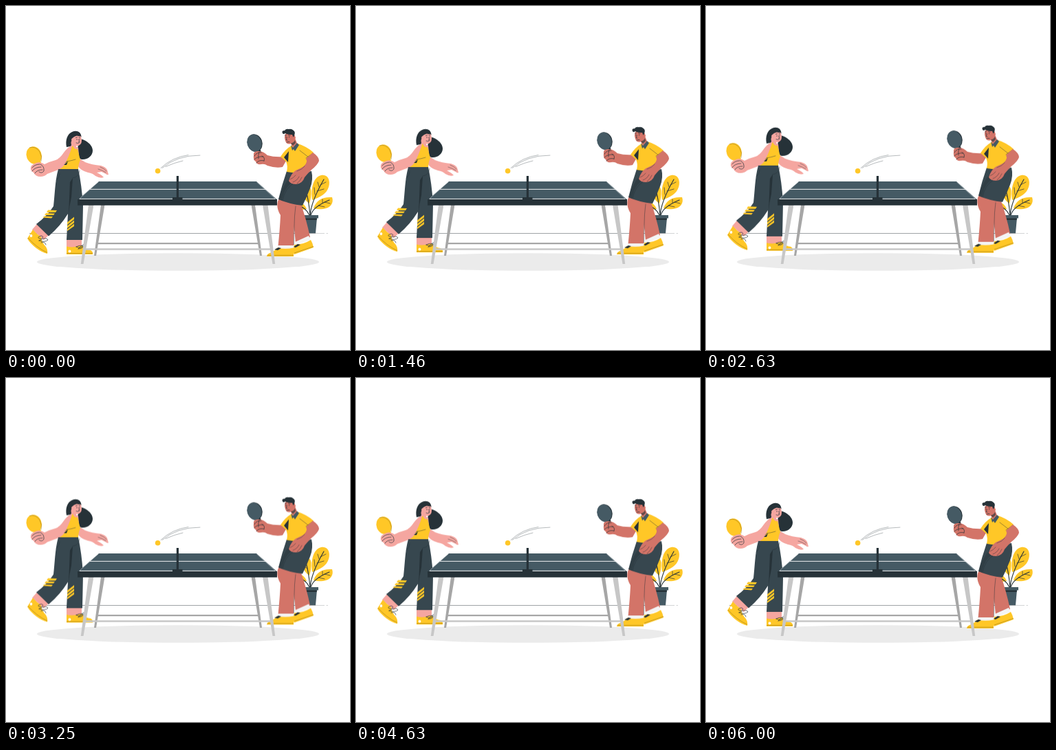
These frames come from a looping animation (500x500 px, 6.04 s). An HTML page:

```html
<!DOCTYPE html>
<html lang="en">
<head>
<meta charset="utf-8">
<title>Table tennis</title>
<style>
  html, body { margin: 0; width: 100%; height: 100%; overflow: hidden; background: #fff; }
  svg { display: block; width: 100vw; height: 100vh; }
  .dark { fill: #263238; }
  .cloth { fill: #37474f; }
  .slate { fill: #455a64; }
  .gold { fill: #ffc727; }
  .pink { fill: #f5a6a0; }
  .tan { fill: #d37468; }
  .near { fill: #c7c7c7; }
  .far { fill: #a6a6a6; }
  .white { fill: #fff; }
  .ink { fill: none; stroke: #263238; stroke-width: .7; stroke-linecap: round; stroke-linejoin: round; }
  .fine { stroke-width: .45; }
  .bold { stroke-width: 1.1; }
  .sole { fill: none; stroke: #8a6a10; stroke-width: .5; }
  .edge { fill: none; stroke: #fff; stroke-width: .9; }
  .floor { fill: none; stroke: #263238; stroke-width: .6; }
</style>
</head>
<body>
<svg viewBox="0 0 500 500">
  <ellipse cx="250" cy="372" rx="205" ry="12.800" fill="#ebebeb"/>
  <path class="floor" d="M34 330.500H450" opacity=".75"/>
  <path class="floor" d="M450 330.500H463M465.500 330.500H468" opacity=".35"/>

  <g id="plant">
    <path class="gold" d="M445 282C443 266 446 249 458 246C468 244 472 254 469 263C466 273 457 278 445 282Z"/>
    <path class="gold" d="M447 294C451 282 460 277 474 278C477 287 471 294 461 295Q453 296 447 294Z"/>
    <path class="gold" d="M441 287C431 281 428 268 436 262Q442 260 443.500 268Q444 278 441 287Z"/>
    <path class="gold" d="M437 295C427 298 421 294 421 287C427 283 434 287 437 295Z"/>
    <path class="ink bold" d="M442 305Q443 285 462 252M443 304Q446 292 470 282M442 304Q440 283 436 268M441 304Q436 293 424 290"/>
    <path class="ink" d="M449 274L448 264M452 269L462 266M455 263L453 256M457 260L465 256M454 290L463 292M460 286L460 281M463 285L471 287M438 277L434 274M430 291L428 295"/>
    <path class="slate" d="M433 308H452L450 330H436Z"/>
    <path class="dark" d="M433 308H452L451.600 311H433.600Z"/>
    <path class="slate" d="M431 304H454V308.500H431Z"/>
  </g>

  <g id="players">
    <g id="girl">
      <!-- far arm -->
      <path class="pink" d="M104 220L115 227Q125 231 138 232Q145 234 147 238L149 245Q147 246 145 244L139 241L132 242Q140 246 142 249Q137 251 130 247Q126 243 119 242Q108 239 104 232Z"/>
      <path class="ink fine" d="M137 234Q143 236 146 240M134 237Q141 239 145 242"/>
      <!-- hair and head -->
      <path class="dark" d="M107 193C116 194 126 202 126 210C126 218 118 224 110 223C104 222 106 214 104 207Z"/>
      <path class="dark" d="M88 205C86 195 89 186 96 183C102 180 109 182 109.500 190L104 200L94 204Z"/>
      <path class="pink" d="M94 196Q97 188 108 188Q111 194 109.500 199Q107 204 102 203L103 212L92 210L95 202Z"/>
      <path class="dark" d="M92 199Q92 187 101 183Q108 183 109 189Q104 190 102 187Q98 191 95 192Q96 196 94 199Z"/>
      <path class="ink" d="M103 193.500v1M107 193v1M105.500 194L107 197L105.500 197.500M102 199Q105 200.500 107 198.500M101.500 191.500l2-.7M106 190.800l1.500.2"/>
      <!-- trunk -->
      <path class="pink" d="M96 202L105 206L106 216L90 216Z"/>
      <path class="gold" d="M97 203Q99 209 104 208Q106 216 108 224Q105 230 105 238H77L85 224L93 207Z"/>
      <!-- racket -->
      <ellipse class="gold" cx="40.700" cy="217" rx="11" ry="13" transform="rotate(-22 40.700 217)"/>
      <path class="sole" d="M34 206Q43 203 49 212Q53 219 51 226"/>
      <path class="gold" d="M42 228L50 225L57 243L53 245Z"/>
      <!-- near arm -->
      <path class="pink" d="M95 203Q89 206 84 213Q78 222 72 224Q64 226 56 230Q50 226 44 228Q36 231 36 235Q35 239 40 242Q43 248 50 248Q56 248 60 244L76 238Q84 235 88 225Q94 212 96 204Z"/>
      <path class="ink" d="M38 235Q42 230 49 230M38 240Q42 234 51 234M42 243Q45 238 53 238M50 230Q56 233 55 240Q52 244 48 241"/>
      <path class="ink fine" d="M88 226Q95 225 101 223M86 228L89 226"/>
      <path class="dark" d="M84 231L90 226L88 231Z"/>
      <!-- legs -->
      <path class="pink" d="M45 317L62 333L55 340L38 325ZM88 338H110V351H88Z"/>
      <path class="cloth" d="M76 237H105Q110 260 112 290L111 340H88L90 302Q79 320 62 334.500L44 317Q61 304 69 291C71 275 71 255 76 237Z"/>
      <path class="dark" d="M97 250L93 256L91 304Q92 290 95 278Z"/>
      <path class="ink fine" d="M97 250Q106 249 107 239M78 243Q78 249 73 253"/>
      <path class="gold" d="M61 296.500L74 297L72 300H59ZM58 301L71 301.500L69 304H56ZM55 305.500L68 306L66 308.500L54 307.500Z"/>
      <path class="gold" d="M89 314.500L99 306.500V310L89 318ZM89 319.500L99 311.500V315L89 323ZM89 324.500L99 316.500V320L89 327Z"/>
      <!-- shoes -->
      <path class="gold" d="M39 325Q45 332 51 336Q52 344 58 350Q61 355 60 360Q52 358 44 352Q35 345 31 338Z"/>
      <path class="sole" d="M32 337Q44 351 60 358.500"/>
      <path class="ink" d="M47 336Q52 332 54 336Q51 340 47 337M48 341Q59 335 61 340Q57 344 48 341M51 344Q57 342 58 347"/>
      <circle class="white" cx="36.500" cy="334" r="1.900"/>
      <path class="gold" d="M88 349.500Q98 352 110 348Q115 354 123 355Q127 357 126 361H88Z"/>
      <path class="sole" d="M88 359.500H126"/>
      <path class="ink" d="M102 350Q108 347 112 349Q108 353 102 350M105 353Q113 345 114 347Q112 353 105 353"/>
      <circle class="white" cx="92.500" cy="356.500" r="1.900"/>
    </g>

    <g id="boy">
      <!-- racket -->
      <path class="dark" d="M364 209L369 207L376 226L372 227Z"/>
      <ellipse class="dark" cx="361.800" cy="199" rx="10.700" ry="13" transform="rotate(-20 361.800 199)"/>
      <ellipse class="slate" cx="361" cy="199.200" rx="10.500" ry="12.800" transform="rotate(-20 361 199.200)"/>
      <!-- far arm -->
      <path class="tan" d="M404 219Q390 220 380 217Q373 210 366 211Q359 211 360 217Q359 224 363 226Q364 231 371 230Q376 229 380 232Q392 236 402 234L410 220Z"/>
      <path class="ink" d="M361 218Q365 212 371 213M361 223Q366 218 374 219M364 228Q368 223 375 225M368 212Q366 217 367 222M372 218Q377 220 375 225"/>
      <!-- legs -->
      <path class="tan" d="M414 286L429 289Q436 308 442 336L421 345Q419 316 412 292Z"/>
      <path class="tan" d="M397 280L422 286Q422 298 419 312L418 349H395.500Q398 325 399 304C396 299 393 292 395 284Z"/>
      <path class="ink fine" d="M421 291Q419 305 419 320L418.500 347"/>
      <path fill="#f4f4f4" d="M395 348H418V353H395ZM420 343L440 334L442.500 340L420 348Z"/>
      <path class="cloth" d="M408 240Q426 244 444 240Q447 252 442 265Q437 278 431 290Q412 288 396 281Q401 260 408 240Z"/>
      <path class="dark" d="M414 250L417 256Q404 264 401 283L396 281Q401 266 408 255Z" opacity=".4"/>
      <path class="ink fine" d="M418 258Q405 265 402 283"/>
      <!-- shoes -->
      <path class="gold" d="M419 347Q432 347 443 340Q446 345 447 351L419 361L417 358Z"/>
      <path class="sole" d="M419 359L447 349.500"/>
      <path class="dark" d="M418 350L424 346L428 347L421 351Z"/>
      <path class="gold" d="M394 351.500Q406 354 418 351.500V364H379Q379 360 386 358Q391 356 394 351.500Z"/>
      <path class="sole" d="M380 362.300H418"/>
      <path class="dark" d="M390 354L396 351L400 352L395 355Z"/>
      <!-- trunk -->
      <path class="gold" d="M415 203Q406 208 399 219L407 226Q410 232 408 241Q426 244 441 241L442 220L447 213Q437 204 424 200Z"/>
      <path class="dark" d="M411 211L404 220L410 227Z"/>
      <path class="ink fine" d="M427 210L440 220M430 237L437 229M436 221L446 214"/>
      <!-- head -->
      <path class="tan" d="M406 186Q412 182 418 186Q421 188 420 192L424 202L418 208L414 200Q408 202 406 196Q404 190 406 186Z"/>
      <path class="dark" d="M414 199.500Q418 199 420 195L421 199L417 203Z" opacity=".65"/>
      <path class="dark" d="M402 185Q400 181 405 181Q407 178 411 179Q415 178 418 181Q421 183 419 188L418 192L416 187Q409 187 406 185Q403 187 402 185Z"/>
      <circle class="tan" cx="419" cy="191.500" r="1.900"/>
      <path class="ink" d="M407 190v1M411.500 190v1M408.500 191L407 194.500L409 195M408 198Q410 197 412 197.500M405.500 188l2-.3M410.500 187.700l2.500.7"/>
      <path class="slate" d="M414 202L417 206L423 199L426 202L420 211L418 208L416 210Z"/>
      <!-- near arm -->
      <path class="tan" d="M446 213Q455 219 455 225Q453 231 444 238Q438 244 434 249Q431 258 422 259Q413 259 411 254Q414 244 421 239Q428 236 433 233Q439 227 436 222Z"/>
      <path class="ink fine" d="M413 252Q418 250 421 246M417 256Q423 254 426 248M423 258Q428 254 430 249M423 240Q430 238 434 233"/>
    </g>
  </g>

  <g id="table">
    <path class="far" d="M131 344H368V346.200H131ZM138 289H143.500L131 363H128ZM356.500 289H362L372 363H369Z"/>
    <path class="near" d="M114 352.200H386V354.700H114ZM120 289H127.500L112.500 375H108.800ZM373 289H380.500L391.200 375H387.500Z"/>
    <path class="slate" d="M135 255H364L393.500 281H105Z"/>
    <path class="edge" d="M122 266.400H378M107 280.400H391.500"/>
    <path class="edge" d="M134 256L106.500 280.400M364.500 256L391.500 280.400" opacity=".4"/>
    <path class="dark" d="M104 281H394V289.800H104Z"/>
    <path class="dark" d="M247.800 247H251V278H256.500V282.500H242V278H247.800Z"/>
  </g>

  <circle class="gold" cx="220.600" cy="239.700" r="3.800"/>
  <path class="ink fine" d="M225 235.500Q241 220 265 216.500M227 235.500Q248 217 282 217M232 233.500Q244 228 257 225" opacity=".75"/>
</svg>
<script>
  const LOOP = 6040, LIFT = -6;
  const at = y => ({ transform: `translateY(${y}px)` });
  document.getElementById('players').animate(
    [at(0), at(LIFT), at(0)],
    { duration: LOOP, iterations: Infinity, easing: 'linear' }
  );
</script>
</body>
</html>
```
